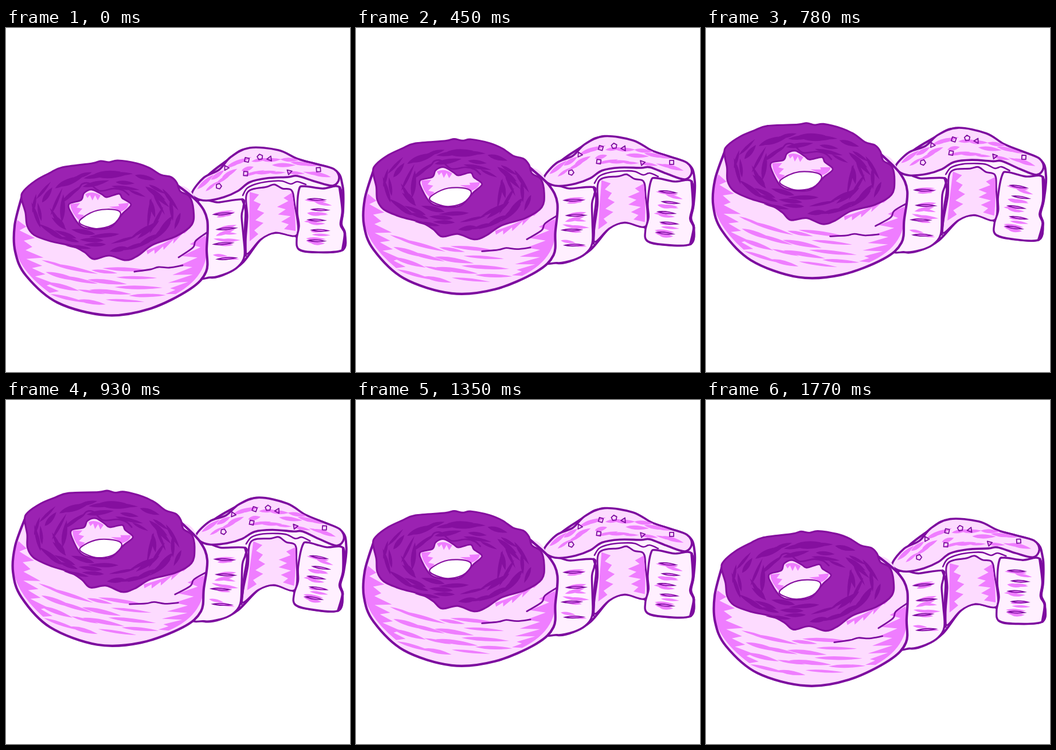
An HTML page that plays this animation: 600x600 px, repeating every 1800 ms.

```html
<!DOCTYPE html>
<html lang="en">
<head>
<meta charset="utf-8">
<title>Two donuts</title>
<style>
html, body { margin: 0; width: 100%; height: 100%; overflow: hidden; background: #fff; }
svg { display: block; width: 100%; height: 100%; }
path { stroke-linejoin: round; stroke-linecap: round; }
</style>
</head>
<body>
<svg viewBox="0 0 600 600"><g id="bitten"></g><g id="whole"></g></svg>
<script>
const INK = '#7d0c9f', GLAZE = '#9b22b2', SHADE = '#850f9f',
      PINK = '#ef7dff', LIGHT = '#fddbff', PALE = '#fff0ff';
const { PI, sin, cos, atan, atan2 } = Math;
let layer, seed = 11;

const rand = (a = 0, b = 1) => a + (b - a) * (seed = seed * 16807 % 2147483647) / 2147483647;
const times = (n, make) => Array.from({ length: n }, (_, i) => make(i));

function add(d, fill, stroke = 'none', width = 0) {
  const p = document.createElementNS('http://www.w3.org/2000/svg', 'path');
  const attrs = { d, fill, stroke, 'stroke-width': width };
  for (const key in attrs) p.setAttribute(key, attrs[key]);
  layer.append(p);
}

// Smooth path through "x,y x,y ..." key points
function curve(text, closed) {
  const p = text.trim().split(/\s+/).map(s => s.split(',').map(Number)), n = p.length;
  const at = i => closed ? p[(i + n) % n] : p[Math.max(0, Math.min(n - 1, i))];
  let d = 'M' + p[0];
  for (let i = 0; i < (closed ? n : n - 1); i++) {
    const [a, b, c, e] = [at(i - 1), at(i), at(i + 1), at(i + 2)];
    d += `C${b.map((v, j) => v + (c[j] - a[j]) / 6)} ${c.map((v, j) => v - (e[j] - b[j]) / 6)} ${c}`;
  }
  return d + (closed ? 'Z' : '');
}
const blob = (pts, fill, stroke, width) => add(curve(pts, true), fill, stroke, width);
const line = (pts, width, color = INK) => add(curve(pts), 'none', color, width);

// Tapered brush stroke centred on x, y
function stroke(x, y, angle, length, width) {
  const ux = cos(angle) * length / 2, uy = sin(angle) * length / 2;
  const nx = -sin(angle) * width, ny = cos(angle) * width, mx = x - ux * .2, my = y - uy * .2;
  return `M${x - ux},${y - uy}Q${mx + nx},${my + ny} ${x + ux},${y + uy}` +
    `Q${mx - nx},${my - ny} ${x - ux},${y - uy}Z`;
}
const strokes = (color, n, make) => add(times(n, i => stroke(...make(i))).join(''), color);

// Jagged band: teeth grow from a quadratic edge a-b-c towards reach
function fringe(color, a, b, c, reach, teeth) {
  const edge = s => a.map((v, j) => v * (1 - s) ** 2 + 2 * b[j] * s * (1 - s) + c[j] * s * s);
  const tips = times(2 * teeth + 1, i => {
    const s = i / (2 * teeth), depth = sin(PI * s) ** .4 * (i % 2 ? rand(.7, 1.1) : rand(.2, .5));
    return edge(s).map((v, j) => v + reach[j] * depth);
  });
  add(`M${a}Q${b} ${c}L${tips.reverse().join(' ')}Z`, color);
}

function face(outline, x, y, width, rows, step, tilt) {
  blob(outline, PALE, INK, 3.4);
  const shift = i => x + (i % 2 ? 3 : -3);
  strokes(PINK, rows * 3, i => [shift(i) + rand(-6, 6), y + (i / 3 | 0) * step + rand(-6, 8),
    tilt + rand(-.25, .25), width * rand(.6, 1), rand(4, 7)]);
  for (const [color, size, thick] of [[INK, 1, 5], [PINK, .55, 1.8]])
    strokes(color, rows, i => [shift(i), y + i * step, tilt, width * size, thick]);
}

function sprinkle(x, y, i) {
  const sides = 3 + i % 3;
  add('M' + times(sides, k => {
    const a = k * 2 * PI / sides + i;
    return [x + 5 * cos(a), y + 5 * sin(a)];
  }).join('L') + 'Z', 'none', INK, 1.8);
}

function drawBitten() {
  layer = document.getElementById('bitten');
  blob(`330,290 392,226 425,210 475,214 508,229 572,247 587,275 588,318 585,342 591,358 587,387 540,391
    511,386 507,364 470,357 444,369 414,408 385,428 357,435 330,420`, PALE, INK, 4);

  blob(`421,287 455,277 468,273 482,280 498,283 503,305 508,360 470,357 444,369 421,394 418,375 421,330`,
    LIGHT, INK, 3);
  fringe(PINK, [425, 286], [424, 330], [425, 372], [30, -8], 5);
  fringe(PINK, [499, 287], [505, 320], [505, 354], [-34, 6], 5);

  face(`330,309 372,304 412,299 414,312 411,328 414,362 416,397 405,416 385,428 357,435 330,425`,
    382, 324, 40, 4, 26, -.08);
  face(`511,282 520,276 552,280 582,278 587,318 584,343 591,358 587,387 540,391 511,386 507,368 511,345
    508,320`, 545, 299, 36, 5, 18, .04);
  line('412,299 418,318 417,350 418,397', 4);
  line('582,278 587,318 584,343 591,358 587,387', 4.6);

  blob(`325,286 345,261 372,247 392,225 425,209 475,213 508,228 540,237 572,246 581,262 570,275 540,268
    508,258 492,260 455,262 425,269 405,284 380,295 350,301 330,296`, LIGHT, INK, 3.6);
  strokes(PINK, 20, i => {
    const x = 348 + i * 10.5, d = x - 455, bend = d < 0 ? .0034 : .0018;
    return [x, 238 + d * d * bend + rand(-13, 14), atan(2 * bend * d) - .1, rand(22, 42), rand(4, 8)];
  });
  line('413,292 421,279 440,271 466,267 482,267 497,272 508,268 523,273', 2.6);
  [[384, 244], [420, 230], [443, 225], [460, 228], [418, 254], [371, 276], [494, 251], [545, 247]]
    .forEach(([x, y], i) => sprinkle(x, y, i));
}

function drawWhole() {
  layer = document.getElementById('whole');
  const side = `27,296 15,345 16,390 35,432 90,479 175,501 250,490 320,456 349,425 350,385 351,335 335,304
    300,275`;
  blob(side + ' 200,310 60,310', LIGHT);

  // Dough shading
  fringe(PINK, [20, 335], [-6, 402], [76, 462], [46, 8], 8);
  fringe(PINK, [348, 362], [362, 428], [296, 464], [-50, 10], 7);
  fringe(PINK, [325, 344], [290, 372], [245, 388], [-14, 20], 5);
  strokes(PINK, 16, i => {
    const x = 70 + i * 11 + rand(0, 20);
    return [x, 400 + i % 4 * 18 + 25 * sin((x - 50) / 75), .32 - (x - 60) * .0018, rand(45, 85), rand(4, 8)];
  });
  line('224,425 252,421 266,417 285,418 308,414', 2.8);
  line('350,357 331,371 326,383 301,400', 2.8);
  line(side, 4.2);

  // Glaze, brushed along rings around the hole
  blob(`27,297 31,284 52,266 76,253 98,243 150,236 165,232 180,234 195,231 228,236 250,244 270,256 288,260
    298,270 304,285 320,294 327,318 324,343 297,363 256,378 230,397 209,405 180,397 153,403 137,391
    115,380 78,372 49,361 37,345 34,322`, GLAZE, SHADE, 3.2);
  strokes(SHADE, 52, i => {
    const a = i * 2.4, r = rand(.5, .87), dx = 150 * cos(a), dy = 82 * sin(a);
    return [175 + dx * r, 318 + dy * r, atan2(82 * cos(a), -150 * sin(a)) - .12, rand(30, 55), rand(5, 9)];
  });
  line('107,296 126,281 133,272 145,271 163,284 188,280 204,283 214,291', 2.8, SHADE);

  // Hole
  blob(`110,307 131,300 136,288 150,282 167,290 176,295 197,289 203,297 218,308 204,323 183,347 155,351
    131,346 114,323`, LIGHT, SHADE, 2.8);
  fringe(PINK, [112, 307], [113, 322], [128, 336], [20, -8], 3);
  fringe(PINK, [214, 305], [214, 316], [196, 322], [-32, -3], 3);
  fringe(PINK, [138, 290], [150, 283], [165, 292], [0, 14], 3);
  blob('129,341 135,330 160,318 190,317 200,325 186,343 157,350', '#fff', SHADE, 2.2);
}

function pose(id, k, x, y, rise, turn) {
  document.getElementById(id).setAttribute('transform', `translate(0 ${-rise * k}) rotate(${turn * k} ${x} ${y})`);
}

function frame(now) {
  const t = Math.floor(now % 1800 / 30) * 30;
  const k = 1 - Math.abs(1 - t / 900);
  pose('whole', k, 165, 345, 77, 6);
  pose('bitten', k, 465, 335, 36, 7.5);
  requestAnimationFrame(frame);
}

drawBitten();
drawWhole();
frame(0);
</script>
</body>
</html>
```
